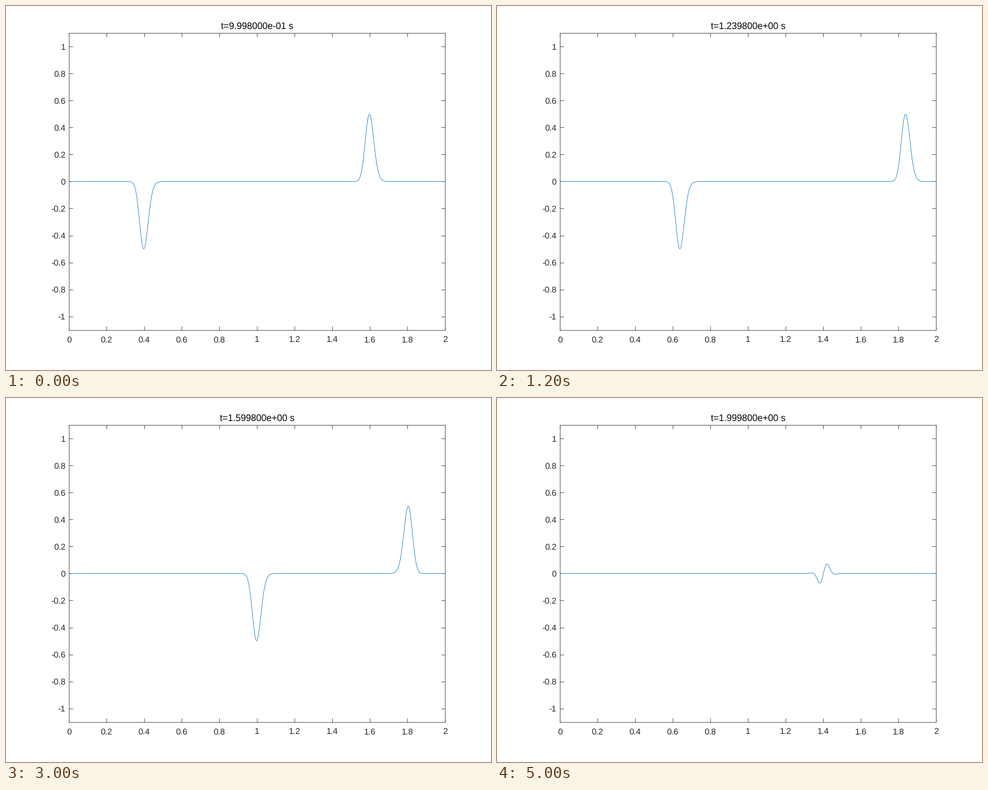
A matplotlib script for the animation above (5.2 s loop, 864x648 px).

```python
import numpy as np
import matplotlib.pyplot as plt
from matplotlib.animation import FuncAnimation

W, H, DPI = 864, 648, 72
FRAMES, STEP_MS = 26, 200
T0, DT = 0.9998, 0.04
# Plot box in pixels, y counted from the top
LEFT, RIGHT, TOP, BOTTOM = 112.48, 782.48, 48.3, 576.6
DARK = (0.15, 0.15, 0.15)
BLUE = (0, 0.447, 0.741)
THIN = 0.78

plt.rcParams["font.family"] = "Liberation Sans"
plt.rcParams["text.hinting"] = "none"

fig = plt.figure(figsize=(W / DPI, H / DPI), dpi=DPI, facecolor="white")
ax = fig.add_axes([LEFT / W, 1 - BOTTOM / H,
                   (RIGHT - LEFT) / W, (BOTTOM - TOP) / H])
ax.set(xlim=(0, 2), ylim=(-1.1, 1.1))
ax.set_xticks(np.linspace(0, 2, 11))
ax.set_yticks(np.linspace(-1, 1, 11))
ax.set_axisbelow(True)
ax.tick_params(direction="in", length=6.7, width=THIN, color=DARK,
               top=True, right=True, labelbottom=False, labelleft=False)
for spine in ax.spines.values():
    spine.set(linewidth=THIN, edgecolor=DARK)


def label(x, y, text, size=15, color=DARK, ha="center"):
    """Place text with its baseline at pixel (x, y), y counted from the top."""
    return fig.text(x / W, 1 - y / H, text, fontsize=size, color=color,
                    ha=ha, va="baseline")


for i in range(11):
    x_px = LEFT + (RIGHT - LEFT) * i / 10
    label(x_px - 0.3, 598.5, f"{i / 5:g}")
    value = (i - 5) / 5
    y_px = BOTTOM - (BOTTOM - TOP) * (value + 1.1) / 2.2
    label(106, y_px + 5.8, f"{value:g}", ha="right")

title = label(447, 42, "", size=16.5, color="black")
xs = np.linspace(0, 2, 1001)
curve, = ax.plot(xs, 0 * xs, color=BLUE, linewidth=THIN)


def pulse(d):
    """Slightly skewed bell of height 0.5 with the longer slope in front."""
    z = np.clip(d / 0.0229, -8, 8)
    return 0.495 * np.exp(-z**2 / 2 - 0.132 * z + 0.028 * z**3)


def update(i):
    t = T0 + DT * i
    # The upright pulse bounces off the free end at x = 2.
    u = pulse(xs - t - 0.6) + pulse(4 - xs - t - 0.6) - pulse(xs - t + 0.6)
    curve.set_ydata(u)
    title.set_text(f"t={t:.6e} s")
    return curve, title


anim = FuncAnimation(fig, update, frames=FRAMES, interval=STEP_MS,
                     repeat=True, repeat_delay=0, blit=False)
plt.show()
```
